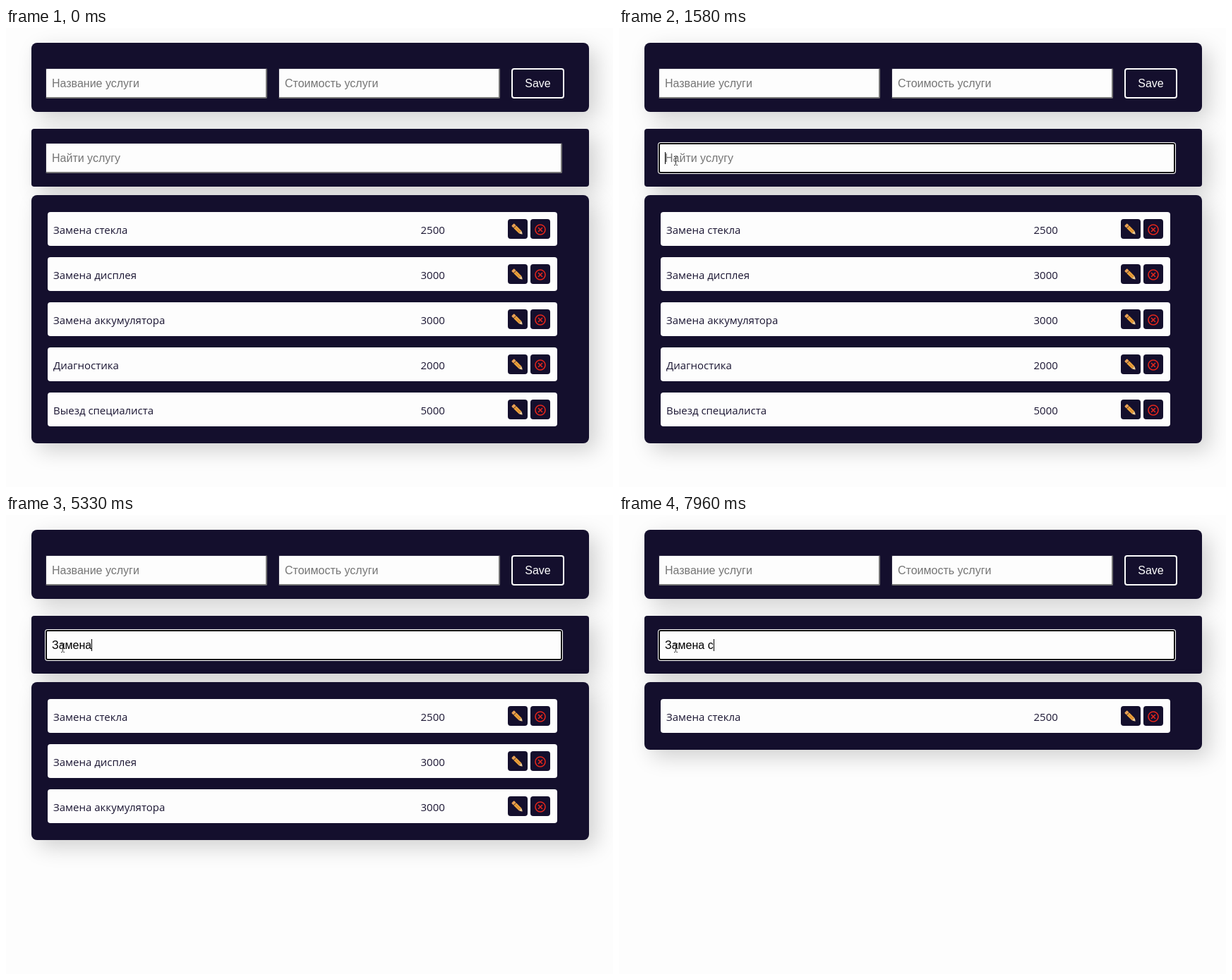
Write an HTML page that moves like this. It is 860 px wide and 651 px high and loops after 8 s.

```html
<!DOCTYPE html>
<html lang="ru">
<head>
<meta charset="utf-8">
<title>Услуги</title>
<style>
  html, body { margin: 0; width: 100%; height: 100%; overflow: hidden; background: #fdfdfd; }
  #stage { position: relative; width: 860px; height: 651px; overflow: hidden; }
  #stage div, #stage svg { position: absolute; box-sizing: border-box; }
  .panel { left: 36px; width: 790px; border-radius: 8px; background: #140f2d;
    box-shadow: 10px 10px 30px rgba(0, 0, 0, .18); }
  .field { height: 43px; padding-left: 8px; white-space: pre; color: #757575;
    font: 16px/41px "Liberation Sans", Arial, sans-serif; background: #fdfdfd;
    border: solid; border-width: 1px 2px 2px 1px; border-radius: 2px;
    border-color: #2b2740 #767676 #767676 #2b2740; }
  .field.focus { border: 2px solid #101010; border-radius: 3px; padding-left: 7px;
    line-height: 39px; box-shadow: 0 0 0 1px #fdfdfd; }
  .field.typed { color: #000; }
  #caret { display: inline-block; width: 1px; height: 17px; margin-right: -1px;
    vertical-align: -3px; background: #000; }
  .save { left: 716px; top: 57px; width: 75px; height: 43px; border: 2px solid #fdfdfd;
    border-radius: 4px; color: #fdfdfd; text-align: center;
    font: 16px/39px "Liberation Sans", Arial, sans-serif; }
  .row { left: 23px; width: 722px; height: 48px; border-radius: 4px; background: #fdfdfd;
    color: #1b1633; font: 15px/50px "Open Sans", "Noto Sans", sans-serif; }
  .name { left: 8px; white-space: pre; }
  .price { left: 528.5px; }
  .tool { top: 10px; width: 28px; height: 28px; border-radius: 4px; background: #140f2d; }
  .tool svg { left: 0; top: 0; }
</style>
</head>
<body>
<div id="stage">
  <div class="panel" style="top:21px;height:98px"></div>
  <div class="panel" style="top:143px;height:82px;border-radius:4px"></div>
  <div class="panel" id="list" style="top:237px"></div>
  <div class="field" style="left:56px;top:57px;width:314px">Название услуги</div>
  <div class="field" style="left:386px;top:57px;width:314px">Стоимость услуги</div>
  <div class="save">Save</div>
  <div class="field" id="search" style="left:56px;top:163px;width:732px"><span id="typed"></span><span id="caret"></span><span id="hint">Найти услугу</span></div>
  <svg id="beam" width="9" height="15" viewBox="-4.5 -7.5 9 15" fill="none" stroke="#333">
    <path d="M-2.5-6H-1L0-5 1-6H2.5M0-5V5M-2.5 6H-1L0 5 1 6H2.5"/>
  </svg>
</div>
<script>
const LOOP = 8000, BLINK = 530, FOCUS = 1170;
const services = [
  ['Замена стекла', 2500], ['Замена дисплея', 3000], ['Замена аккумулятора', 3000],
  ['Диагностика', 2000], ['Выезд специалиста', 5000]
];
// [time, search text, matching rows]
const steps = [
  [0, '', 5], [3200, 'З', 3], [4350, 'За', 3], [4600, 'Зам', 3], [4830, 'Заме', 3],
  [5050, 'Замен', 3], [5250, 'Замена', 3], [5450, 'Замена ', 3], [7700, 'Замена с', 1]
];
// [time, x, y] of the text pointer
const path = [[500, 76, 202], [720, 79.5, 190.5], [880, 79.5, 190.5], [1050, 80.5, 188.5]];

const $ = id => document.getElementById(id);
const [list, search, typed, caret, hint, beam] =
  ['list', 'search', 'typed', 'caret', 'hint', 'beam'].map($);

const icon = body => `<svg width="28" height="28" viewBox="-14 -14 28 28">${body}</svg>`;
const pencil = icon(`<g transform="translate(0 1) rotate(45)">
  <path d="M-9-2.6h3v5.2h-3q-1 0-1-1v-3.2q0-1 1-1z" fill="#e9a054"/>
  <path d="M-5.5-2.6h10.5v5.2h-10.5z" fill="#eba13c"/>
  <path d="M-5.5 0h10.5" stroke="#c47a22" stroke-width=".8"/>
  <path d="M5-2.6L10 0 5 2.6z" fill="#f0cf9a"/><path d="M8.2-.9L10 0 8.2.9z" fill="#3b3140"/></g>`);
const cross = icon(`<g transform="translate(0 1)" fill="none" stroke="#e3261c" stroke-width="1.6">
  <circle r="7"/><path d="M-3-3L3 3M3-3L-3 3"/></g>`);

list.innerHTML = services.map(([name, price], i) => `
  <div class="row" style="top:${24 + 64 * i}px">
    <div class="name">${name}</div><div class="price">${price}</div>
    <div class="tool" style="left:651.5px">${pencil}</div>
    <div class="tool" style="left:684px">${cross}</div>
  </div>`).join('');
const rows = [...list.children];

function pointerAt(t) {
  const next = path.findIndex(p => p[0] > t);
  if (next < 0) return path[path.length - 1].slice(1);
  const [a, b] = [path[next - 1], path[next]];
  const k = (t - a[0]) / (b[0] - a[0]), ease = k * (2 - k);
  return [1, 2].map(i => a[i] + (b[i] - a[i]) * ease);
}

function draw(t) {
  const [since, text, count] = steps.filter(s => s[0] <= t).pop();
  const focused = t >= FOCUS;
  search.classList.toggle('focus', focused);
  search.classList.toggle('typed', text !== '');
  typed.textContent = text;
  hint.style.display = text ? 'none' : '';
  const blinkOn = Math.floor((t - Math.max(since, FOCUS)) / BLINK) % 2 === 0;
  caret.style.visibility = focused && blinkOn ? 'visible' : 'hidden';

  rows.forEach((row, i) => row.style.display = i < count ? '' : 'none');
  list.style.height = 32 + 64 * count + 'px';

  const shown = t >= path[0][0];
  beam.style.visibility = shown ? 'visible' : 'hidden';
  if (shown) {
    const [x, y] = pointerAt(t);
    beam.style.left = x - 4.5 + 'px';
    beam.style.top = y - 7.5 + 'px';
  }
}

const start = performance.now();
function tick() {
  draw((performance.now() - start) % LOOP);
  requestAnimationFrame(tick);
}
tick();
</script>
</body>
</html>
```
